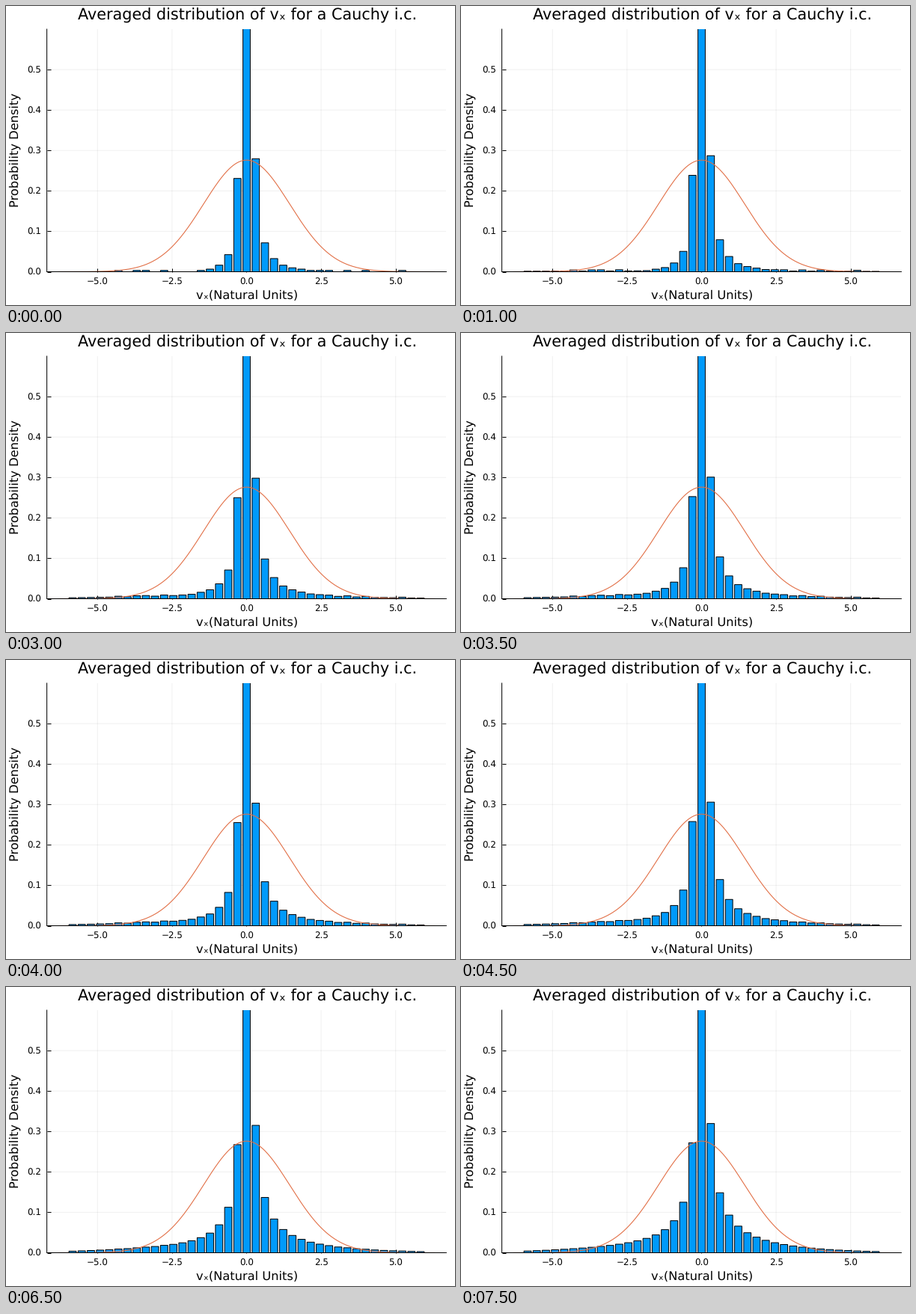
A matplotlib script that plays this animation: 600x400 px, repeating every 8 s.

```python
import numpy as np
import matplotlib.pyplot as plt
from matplotlib.animation import FuncAnimation

W, H, DPI = 600, 400, 100
FRAMES, INTERVAL = 16, 500
LEFT, RIGHT, TOP, BOTTOM = 54.6, 588.4, 31, 355.5
X_MAX, Y_MAX = 6.7, 0.6
PX = 72 / DPI
SPACING = 0.3072
SAMPLE = 0.00325  # density of a single sample in a bin
CENTRE = 2.4      # the middle bar always leaves the top of the plot

plt.rcParams.update({
    "font.family": "DejaVu Sans",
    "text.hinting": "none",
    "axes.linewidth": PX,
})

bins = np.arange(-19, 20)
dist = np.maximum(abs(bins), 1)


def sides(left, right):
    return np.where(bins < 0, left, right)


# Start: a steep power law in whole samples, with a few strays far out.
counts = np.floor(sides(0.231, 0.28) * dist ** -sides(2.4, 1.95) / SAMPLE)
counts[np.isin(bins, [-14, -12, -11, -9, 11, 13, 17])] += 1
first = counts * SAMPLE

# End: a flatter power law with a cut-off.
final = (sides(0.272, 0.322) * dist ** -sides(1.12, 1.08)
         * np.exp(-(dist / sides(20, 15.2)) ** sides(3, 1.8)))
first[bins == 0] = final[bins == 0] = CENTRE

# Growth exponent: the far tails rise early, the shoulders late.
power = np.interp(dist, [1, 2, 4, 8, 19], [0.83, 1.15, 1.28, 1.25, 0.6])


def heights(i):
    return first + (final - first) * (i / (FRAMES - 1)) ** power


fig = plt.figure(figsize=(W / DPI, H / DPI), dpi=DPI, facecolor="white")
ax = fig.add_axes([LEFT / W, 1 - BOTTOM / H,
                   (RIGHT - LEFT) / W, (BOTTOM - TOP) / H])
ax.set(xlim=(-X_MAX, X_MAX), ylim=(0, Y_MAX))
ax.set_axisbelow(True)
ax.grid(color="black", alpha=0.06, linewidth=PX)
ax.spines[["top", "right"]].set_visible(False)
ax.spines[["left", "bottom"]].set_zorder(5)
xticks = np.arange(-5, 5.1, 2.5)
yticks = np.arange(6) / 10
ax.set_xticks(xticks, [])
ax.set_yticks(yticks, [])
ax.tick_params(direction="in", length=5 * PX, width=PX)


def label(x, y, text, size, **kw):
    """Text with its baseline at pixel (x, y), counted from the top left."""
    kw = {"ha": "center", "va": "baseline", **kw}
    fig.text(x / W, 1 - y / H, text, fontsize=size * PX, **kw)


label(323, 19, "Averaged distribution of vₓ for a Cauchy i.c.", 20.78)
label(322, 392, "vₓ(Natural Units)", 16.3)
label(16.5, 192.5, "Probability Density", 16.3, rotation=90,
      rotation_mode="anchor")
for v in xticks:
    x = LEFT + (v + X_MAX) / (2 * X_MAX) * (RIGHT - LEFT)
    label(x, 372.4, f"{v:.1f}".replace("-", "−"), 11.85)
for v in yticks:
    y = BOTTOM - v / Y_MAX * (BOTTOM - TOP)
    label(47.5, y + 4.7, f"{v:.1f}", 11.85, ha="right")

bars = ax.bar(bins * SPACING, heights(0), width=0.8 * SPACING,
              color="#009afa", edgecolor="black", linewidth=PX, zorder=2)
x = np.linspace(-6.3, 6.3, 400)
sigma = 1.445
ax.plot(x, np.exp(-(x / sigma) ** 2 / 2) / (sigma * np.sqrt(2 * np.pi)),
        color="#e26f46", linewidth=1.1 * PX, zorder=3)

# Keep sub-pixel positions for every line and bar.
for artist in ax.findobj():
    artist.set_snap(False)


def update(i):
    for bar, h in zip(bars, heights(i)):
        bar.set_height(h)
    return bars


anim = FuncAnimation(fig, update, frames=FRAMES, interval=INTERVAL,
                     repeat=True, repeat_delay=0, blit=False)
plt.show()
```
